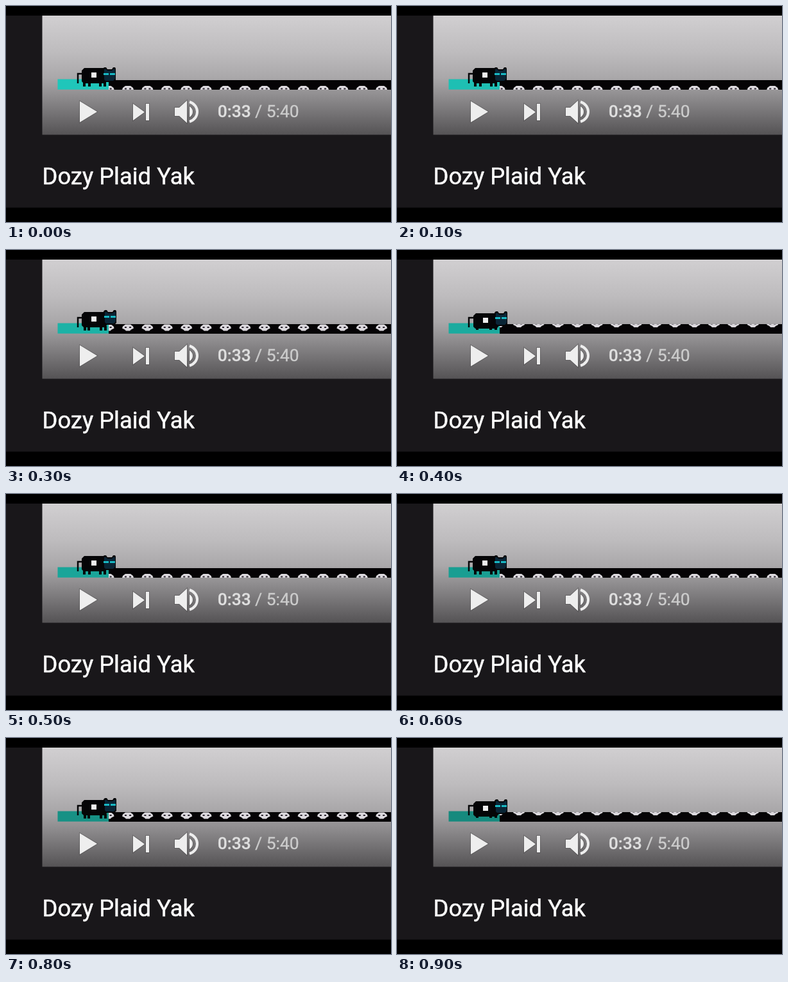
Recreate the animation shown at these times as an HTML page. Size 600 px wide and 338 px high, loop 1000 ms.

```html
<!DOCTYPE html>
<html lang="en">
<head>
<meta charset="utf-8">
<style>
html, body { margin: 0; height: 100%; overflow: hidden; background: #000; }
svg { display: block; width: 600px; height: 338px; font-family: Roboto, sans-serif; }
</style>
</head>
<body>
<svg viewBox="0 0 600 338">
  <defs>
    <linearGradient id="shade" x1="0" y1="0" x2="0" y2="1">
      <stop offset="0" stop-color="#d1cfd1"/>
      <stop offset=".3" stop-color="#bebcbe"/>
      <stop offset=".52" stop-color="#aaa8aa"/>
      <stop offset=".68" stop-color="#8e8c8e"/>
      <stop offset="1" stop-color="#555355"/>
    </linearGradient>
    <clipPath id="track"><rect x="160" y="116" width="440" height="15"/></clipPath>
    <g id="blob">
      <path d="M-4-5H4L8-2L9 1L5 3L3 5H-3L-5 3L-9 1L-8-2Z" fill="#dcd9de"/>
      <path d="M-5-1.5H-2V.5H-5ZM2-1.5H5V.5H2Z" fill="#28222c"/>
    </g>
  </defs>

  <rect y="15" width="600" height="300.5" fill="#19171a"/>
  <rect x="56.5" y="15" width="544" height="186.5" fill="url(#shade)"/>

  <rect id="played" x="80.5" y="114.5" width="80" height="16.2"/>
  <g clip-path="url(#track)">
    <rect x="160" y="116" width="440" height="15" fill="#050305"/>
    <g id="blobs"></g>
  </g>

  <g fill="#050507">
    <path id="tail" fill="none" stroke="#050507" stroke-width="2.5"/>
    <path id="legs" stroke="#050507" stroke-width="4"/>
    <g id="body">
      <path d="M122 97H154L157 100V118L154 121H121L118 118V101Z"/>
      <rect x="133" y="104" width="8" height="8" fill="#eee"/>
    </g>
    <g id="head">
      <path d="M151 97L153 95H156L158 98H165L167 95H170L171 97V115L168 118H154L151 115Z"/>
      <path d="M153 98H156L158 100H165L167 98H170V113L167 116H155L153 114Z" fill="#0a2536"/>
      <path d="M152 104H160V107H152ZM162 104H170V107H162Z" fill="#18b9c4"/>
    </g>
  </g>

  <g fill="#eee" stroke="#333" stroke-opacity=".3" paint-order="stroke" stroke-width="2">
    <path d="M115 149V182L142 165.5Z"/>
    <path d="M198 153V179L216 166ZM218 153H223V179H218Z"/>
    <path d="M263 159H270L282 148V183L270 172H263Z"/>
    <path d="M286 157Q291 160 291 165.5T286 174Z"/>
  </g>
  <path d="M286 150C302 155 302 176 286 181" fill="none" stroke="#eee" stroke-width="4"/>

  <text x="329.8" y="174" font-size="26.4" fill="#ccc" stroke="#ccc" stroke-width=".4"><tspan font-weight="500" fill="#e0e0e0">0:33</tspan> / 5:40</text>
  <text x="56.5" y="279" font-size="36.4" fill="#fff" stroke="#fff" stroke-width=".5">Dozy Plaid Yak</text>
</svg>

<script>
const $ = id => document.getElementById(id);
const curled = 'M119 106H112V121';
const raised = 'M119 118L112 117V108L109 107';
const poses = [
  { blobY: 130, body: [0, 0], head: [0, 1], tail: curled, feet: [122, 130, 147, 154], floor: 126 },
  { blobY: 125, body: [0, 2], head: [0, -1], tail: raised, feet: [119, 132, 144, 153], floor: 125 },
  { blobY: 121.5, body: [0, 0], head: [1, -1], tail: curled, feet: [123, 129, 148, 155], floor: 126 },
  { blobY: 116, body: [1, 2], head: [1, 1], tail: curled, feet: [125, 146, 154], floor: 125 }
];

$('blobs').innerHTML = Array.from({ length: 15 }, (_, i) =>
  `<use href="#blob" x="${159.6 + i * 30.4}"/>`).join('');

const move = (id, x, y) => $(id).setAttribute('transform', `translate(${x} ${y})`);

function draw(now) {
  const step = Math.floor(now % 1000 / 100);
  const pose = poses[Math.floor(step % 5 * 0.8)];
  const fade = (from, to) => Math.round(from + (to - from) * step / 9);

  $('played').setAttribute('fill', `rgb(${fade(31, 22)},${fade(198, 138)},${fade(186, 126)})`);
  move('blobs', 0, pose.blobY);
  move('body', ...pose.body);
  move('head', ...pose.head);
  $('tail').setAttribute('d', pose.tail);
  $('legs').setAttribute('d', pose.feet.map(x => `M${x} 119V${pose.floor}`).join(''));
  requestAnimationFrame(draw);
}
draw(performance.now());
</script>
</body>
</html>
```
